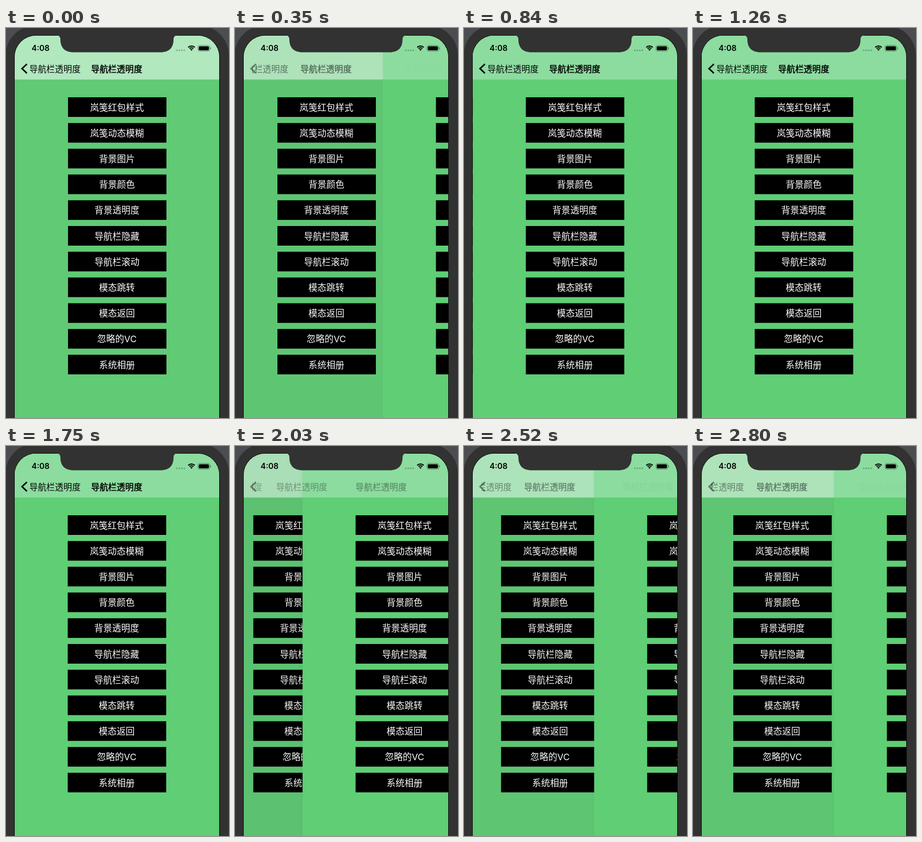
Animation of 410 by 715 pixels, one loop 2870 ms. Source, as an HTML page with a canvas:

```html
<!DOCTYPE html>
<html lang="zh">
<head>
<meta charset="utf-8">
<style>
html, body { margin: 0; width: 100%; height: 100%; overflow: hidden; background: #4b4d50; }
canvas { display: block; }
</style>
</head>
<body>
<canvas id="stage" width="410" height="715"></canvas>
<script>
const ctx = document.getElementById('stage').getContext('2d');
const LOOP = 2870, STEP = 70;
const LEFT = 16, TOP = 14, WIDTH = 376, BAR_BOTTOM = 94.5;
const FONT = 'Inter, "Noto Sans CJK SC", "Noto Sans CJK", sans-serif';
const TITLE = '导航栏透明度';
const LABELS = ['岚笺红包样式', '岚笺动态模糊', '背景图片', '背景颜色', '背景透明度',
  '导航栏隐藏', '导航栏滚动', '模态跳转', '模态返回', '忽略的VC', '系统相册'];

// A thin outline ("heavy") gives a weight between regular and bold.
function text(str, x, y, size, { weight = 400, color = '#000', align = 'left', alpha = 1, heavy = 0 } = {}) {
  ctx.globalAlpha = alpha;
  ctx.font = `${weight} ${size}px ${FONT}`;
  ctx.textAlign = align;
  ctx.fillStyle = ctx.strokeStyle = color;
  ctx.fillText(str, x, y);
  if (heavy) {
    ctx.lineWidth = heavy;
    ctx.strokeText(str, x, y);
  }
  ctx.globalAlpha = 1;
}

function rect(color, x, y, w, h) {
  ctx.fillStyle = color;
  ctx.fillRect(x, y, w, h);
}

function rounded(color, x, y, w, h, r) {
  ctx.beginPath();
  ctx.roundRect(x, y, w, h, r);
  ctx.fillStyle = color;
  ctx.fill();
}

// Critically damped spring with stiffness 1000 and mass 3.
function springRest(ms) {
  const s = Math.sqrt(1000 / 3) * Math.max(0, ms) / 1000;
  return (1 + s) * Math.exp(-s);
}

// Distance of the front page from its resting place: a push, then a drag back.
function frontOffset(t) {
  if (t < 1750) return WIDTH * springRest(t - 287);
  return 243 * (1 - (1 - Math.min(1, (t - 1750) / 1050)) ** 1.9);
}

function page(x, green, bar, inset) {
  rect(green, x, TOP, WIDTH, 715);
  rect(bar, x, TOP, WIDTH, BAR_BOTTOM - TOP);
  LABELS.forEach((label, i) => {
    const y = 127 + i * 47.2;
    rect('#000', x + inset, y, 181, 36);
    text(label, x + inset + 90, y + 24.6, 16.5, { color: '#fff', align: 'center' });
  });
}

function navigation(p) {
  const fadeOut = (1 - p) ** 4, fadeIn = p ** 2.2, y = 80.5, size = 15.7, heavy = 0.45;
  ctx.save();
  ctx.beginPath();
  ctx.rect(32, TOP, LEFT + WIDTH - 32, BAR_BOTTOM - TOP);
  ctx.clip();
  text(TITLE, 156.5 + 226 * p, y, size, { heavy, alpha: fadeOut });
  text(TITLE, 43 + 113.5 * p, y, size, { alpha: fadeOut });
  text(TITLE, 43 + 113.5 * p, y, size, { heavy, alpha: fadeIn });
  text(TITLE, 43 - 122 * (1 - p), y, size, { alpha: 0.25 + 0.75 * p ** 3 });
  ctx.restore();

  ctx.globalAlpha = Math.max(0.45, Math.abs(1 - 2 * p));
  ctx.beginPath();
  ctx.moveTo(38.5, 66);
  ctx.lineTo(29.5, 74.5);
  ctx.lineTo(38.5, 83);
  ctx.lineWidth = 2.8;
  ctx.strokeStyle = '#000';
  ctx.stroke();
  ctx.globalAlpha = 1;
}

function statusBar() {
  text('4:08', 47, 42, 14.5, { weight: 600 });
  for (let i = 0; i < 4; i++) rounded('rgba(0,0,0,.22)', 312.3 + i * 4.6, 39.2, 3.4, 3.4, 1.5);
  ctx.strokeStyle = '#000';
  ctx.lineWidth = 2;
  for (const r of [5.2, 8.6]) {
    ctx.beginPath();
    ctx.arc(341, 41.5, r, -Math.PI * 0.75, -Math.PI * 0.25);
    ctx.stroke();
  }
  ctx.beginPath();
  ctx.moveTo(341, 41.8);
  ctx.arc(341, 41.8, 3.2, -Math.PI * 0.75, -Math.PI * 0.25);
  ctx.fillStyle = '#000';
  ctx.fill();
  ctx.beginPath();
  ctx.roundRect(353, 32, 21.5, 10.5, 3);
  ctx.lineWidth = 1;
  ctx.strokeStyle = 'rgba(0,0,0,.4)';
  ctx.stroke();
  rounded('#000', 354.5, 33.5, 18.5, 7.5, 1.8);
  rounded('rgba(0,0,0,.4)', 375.5, 35.5, 1.5, 3.5, 1);
}

function notch() {
  ctx.beginPath();
  ctx.moveTo(92, 13);
  ctx.quadraticCurveTo(100, 13.5, 100, 21);
  ctx.bezierCurveTo(100, 36, 108, 44.5, 124, 44.5);
  ctx.lineTo(284, 44.5);
  ctx.bezierCurveTo(300, 44.5, 308, 36, 308, 21);
  ctx.quadraticCurveTo(308, 13.5, 316, 13);
  ctx.fillStyle = '#323232';
  ctx.fill();
}

function draw(t) {
  const offset = frontOffset(t), p = offset / WIDTH, edge = LEFT + offset;
  rect('#4b4d50', 0, 0, 410, 715);
  rounded('#323232', -1, -5, 411, 800, 56);
  rounded('#0a0a0a', LEFT - 1, TOP - 1, WIDTH + 2, 800, 40);

  ctx.save();
  ctx.beginPath();
  ctx.roundRect(LEFT, TOP, WIDTH, 800, 39);
  ctx.clip();
  page(LEFT - 0.3 * (WIDTH - offset), '#60ca75', '#b1e8be', 98);
  rect(`rgba(0,0,0,${0.06 * (1 - p)})`, LEFT, TOP, offset, 715);
  const shadow = ctx.createLinearGradient(edge - 9, 0, edge, 0);
  shadow.addColorStop(0, 'rgba(0,0,0,0)');
  shadow.addColorStop(1, `rgba(0,0,0,${0.03 * (1 - p)})`);
  rect(shadow, edge - 9, TOP, 9, 715);
  page(edge, '#5fce75', '#8cdc9f', 97.5);
  navigation(p);
  statusBar();
  ctx.restore();
  notch();
}

function tick() {
  draw(Math.floor(performance.now() % LOOP / STEP) * STEP);
  requestAnimationFrame(tick);
}
tick();
</script>
</body>
</html>
```
